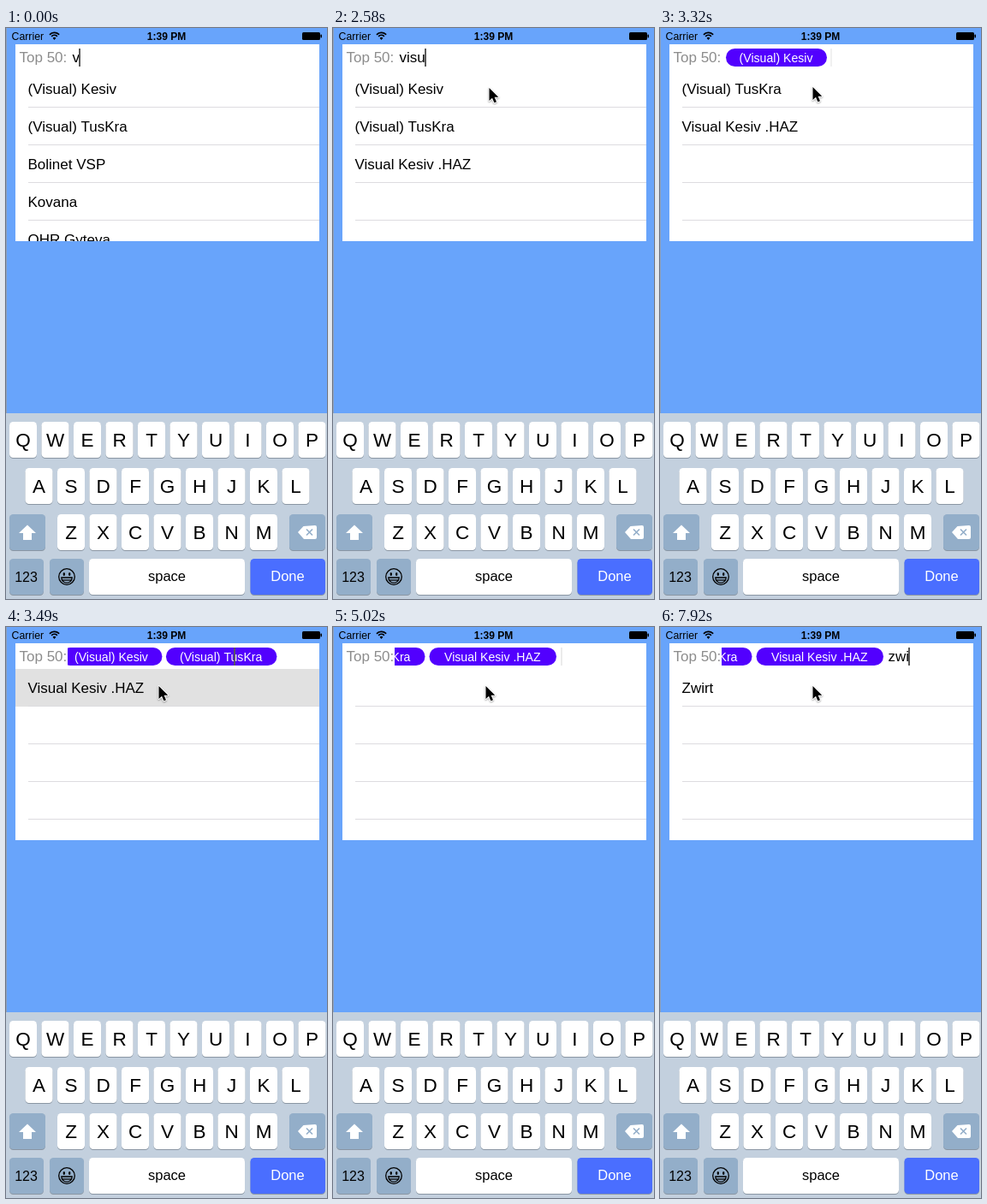
Write an HTML page with a canvas that moves like this. It is 375 by 667 pixels and loops after 8000 ms.

```html
<!DOCTYPE html>
<html lang="en">
<head>
<meta charset="utf-8">
<title>Token field</title>
<style>
html, body { margin: 0; width: 100%; height: 100%; overflow: hidden; background: #68a4fb; }
canvas { display: block; width: 375px; height: 667px; }
</style>
</head>
<body>
<canvas id="stage" width="375" height="667"></canvas>
<script>
const ctx = document.getElementById('stage').getContext('2d');
const LOOP = 8000;
const FONT = '"Liberation Sans", Arial, sans-serif';
const ROW_TOP = 49, ROW_H = 44;
const BASE = '(Visual) Kesiv', TUSK = '(Visual) TusKra', HAZ = 'Visual Kesiv .HAZ';

// Each entry holds from its time until the next one.
const lists = [
  [0, [BASE, TUSK, 'Bolinet VSP', 'Kovana', 'OHR Gyteva']],
  [110, [BASE, TUSK, 'DolVIRN', 'Moviran', HAZ]],
  [350, [BASE, TUSK, HAZ]],
  [2760, [TUSK, HAZ]],
  [3440, [HAZ]],
  [4310, []],
  [5490, ['Arxuno', 'Brixet', 'Doxalin', 'Korux', 'Mexado']],
  [7380, ['Azuno', 'Brezil', 'Gozanta', 'Kizmer', 'Lozeda']],
  [7680, ['Zwirt']]
];
const typed = [
  [0, 'v'], [60, 'vi'], [350, 'vis'], [530, 'visu'], [2760, ''],
  [5430, 'x'], [7210, ''], [7380, 'z'], [7680, 'zw'], [7920, 'zwi']
];
const inputStart = [[0, 77], [2760, 199], [3440, 266]];
const caretStates = [
  [0, 1], [1100, 0], [1540, 1], [2090, 0], [2480, 1], [2700, 1], [3180, 0],
  [3400, 1], [3890, 0], [4310, 1], [4885, 0], [5350, 1], [5885, 0],
  [6340, 1], [6890, 0], [7200, 1]
];
// Token left edge and width are relative to the scrolled content.
const tokens = [
  { at: 2760, x: 0, w: 118, text: BASE },
  { at: 3440, x: 122.5, w: 129.5, text: TUSK },
  { at: 4310, x: 257, w: 148.5, text: HAZ }
];
const taps = [[2700, 2760, 2980], [3380, 3440, 3670], [4130, 4310, 4540]];

const clamp = v => Math.max(0, Math.min(1, v));
const easeOut = v => 1 - (1 - clamp(v)) ** 3;
const smooth = v => { v = clamp(v); return v * v * (3 - 2 * v); };
const mix = (a, b, k) => a + (b - a) * k;
const indexAt = (track, t) => track.findLastIndex(e => e[0] <= t);
const valueAt = (track, t) => track[indexAt(track, t)][1];

function rect(x, y, w, h, color) {
  ctx.fillStyle = color;
  ctx.fillRect(x, y, w, h);
}

function rounded(x, y, w, h, r, color) {
  ctx.fillStyle = color;
  ctx.beginPath();
  ctx.roundRect(x, y, w, h, r);
  ctx.fill();
}

function polygon(points, color) {
  ctx.fillStyle = color;
  ctx.beginPath();
  points.forEach(([x, y]) => ctx.lineTo(x, y));
  ctx.closePath();
  ctx.fill();
}

function text(str, x, y, size, color = '#000', align = 'left', weight = '') {
  ctx.font = `${weight} ${size}px ${FONT}`;
  ctx.textAlign = align;
  ctx.fillStyle = color;
  ctx.fillText(str, x, y);
}

function clipped(x, y, w, h, draw) {
  ctx.save();
  ctx.beginPath();
  ctx.rect(x, y, w, h);
  ctx.clip();
  draw();
  ctx.restore();
}

function statusBar() {
  text('Carrier', 6.5, 13.5, 12.3);
  text('1:39 PM', 187.5, 13.5, 12, '#000', 'center', 'bold');
  ctx.strokeStyle = '#000';
  ctx.lineWidth = 1.7;
  for (const r of [4.6, 7.6]) {
    ctx.beginPath();
    ctx.arc(56.5, 13, r, -Math.PI * 0.76, -Math.PI * 0.24);
    ctx.stroke();
  }
  ctx.fillStyle = '#000';
  ctx.beginPath();
  ctx.moveTo(56.5, 14);
  ctx.arc(56.5, 13.5, 2.6, -Math.PI * 0.76, -Math.PI * 0.24);
  ctx.fill();
  rounded(346, 5, 21, 9, 1.5, '#000');
  rounded(367.5, 7.5, 1.5, 4, 0.7, '#000');
}

function key(x, y, w, color = '#fff') {
  rounded(x, y + 1, w, 42, 4.5, '#8a96a3');
  rounded(x, y, w, 42, 4.5, color);
}

function keyboard() {
  const gray = '#93aec9';
  rect(0, 450, 375, 217, '#c3d0de');
  [['QWERTYUIOP', 4, 460], ['ASDFGHJKL', 22.5, 514], ['ZXCVBNM', 60, 568]].forEach(([row, left, y]) => {
    [...row].forEach((letter, i) => {
      const x = left + i * 37.5;
      key(x, y, 32);
      text(letter, x + 16, y + 29, 22.5, '#000', 'center');
    });
  });

  key(4, 568, 42, gray);
  polygon([[25, 580.5], [35, 590], [30, 590], [30, 598], [20, 598], [20, 590], [15, 590]], '#fff');

  key(331, 568, 42, gray);
  ctx.fillStyle = '#fff';
  ctx.beginPath();
  ctx.moveTo(341, 589);
  ctx.lineTo(347.5, 582);
  ctx.lineTo(361, 581);
  ctx.arcTo(363, 581, 363, 583, 2);
  ctx.arcTo(363, 597, 361, 597, 2);
  ctx.lineTo(348, 597);
  ctx.closePath();
  ctx.fill();
  ctx.strokeStyle = gray;
  ctx.lineWidth = 1.6;
  ctx.beginPath();
  ctx.moveTo(351, 585.5); ctx.lineTo(358, 592.5);
  ctx.moveTo(358, 585.5); ctx.lineTo(351, 592.5);
  ctx.stroke();

  key(4, 620, 40, gray);
  text('123', 23.5, 647, 16, '#000', 'center');
  key(51, 620, 40, gray);
  smiley(71, 641);
  key(97, 620, 182);
  text('space', 188, 646, 16.5, '#000', 'center');
  key(285.5, 620, 87.5, '#4a6eff');
  text('Done', 329, 646, 16.5, '#fff', 'center');
}

function smiley(x, y) {
  ctx.strokeStyle = ctx.fillStyle = '#000';
  ctx.lineWidth = 1.3;
  ctx.beginPath();
  ctx.arc(x, y, 9.3, 0, Math.PI * 2);
  ctx.stroke();
  for (const dx of [-3.2, 3.2]) {
    ctx.beginPath();
    ctx.ellipse(x + dx, y - 3, 1.2, 1.9, 0, 0, Math.PI * 2);
    ctx.fill();
  }
  ctx.beginPath();
  ctx.arc(x, y + 1, 6.2, 0, Math.PI);
  ctx.closePath();
  ctx.stroke();
  ctx.beginPath();
  ctx.moveTo(x - 5, y + 4);
  ctx.lineTo(x + 5, y + 4);
  ctx.stroke();
}

function results(t) {
  clipped(11, 19, 355, 230, () => {
    for (const [down, commit, end] of taps) {
      if (t < down || t >= end) continue;
      ctx.globalAlpha = 1 - clamp((t - commit) / (end - commit));
      rect(11, ROW_TOP, 355, ROW_H, '#d9d9d9');
      ctx.globalAlpha = 1;
    }
    for (let i = 1; i < 5; i++) rect(26, ROW_TOP - 1 + i * ROW_H, 340, 1, '#dddce0');
    valueAt(lists, t).forEach((name, i) => text(name, 25.5, 77 + i * ROW_H, 17));
  });
}

function caretAlpha(t) {
  const i = indexAt(caretStates, t);
  const [start, goal] = caretStates[i];
  const from = i ? caretStates[i - 1][1] : 1;
  return mix(from, goal, clamp((t - start) / (goal ? 100 : 155)));
}

function inputField(t) {
  text('Top 50:', 15.5, 40, 17, '#8c8c8c');
  const scroll = 100 * smooth((t - 3440) / 230) + 121.5 * smooth((t - 4310) / 230);
  clipped(72, 20, 292, 29, () => {
    for (const token of tokens) {
      if (t < token.at) continue;
      const x = 77 + token.x - scroll;
      rounded(x, 24, token.w, 21, 10.5, '#5200fe');
      text(token.text, x + token.w / 2 - 0.5, 39.5, 14.1, '#fff', 'center');
    }
  });
  const start = valueAt(inputStart, t), str = valueAt(typed, t);
  text(str, start + 0.5, 40, 17);
  ctx.globalAlpha = caretAlpha(t);
  rect(Math.floor(start + ctx.measureText(str).width), 24, 2, 21, '#5a5a5a');
  ctx.globalAlpha = 1;
}

function pointer(t) {
  if (t < 1890) return;
  const k = easeOut((t - 1890) / 660), nudge = smooth((t - 2580) / 140);
  ctx.save();
  ctx.translate(mix(303, 182, k) - 4 * nudge, mix(321, 70, k) - nudge);
  ctx.beginPath();
  [[0.5, 0], [0.5, 15], [4, 11.8], [6.4, 17.3], [9, 16.2], [6.6, 10.8], [11.3, 10.8]]
    .forEach(([x, y]) => ctx.lineTo(x, y));
  ctx.closePath();
  ctx.shadowColor = 'rgba(0,0,0,.35)';
  ctx.shadowBlur = 2;
  ctx.shadowOffsetY = 1;
  ctx.strokeStyle = '#fff';
  ctx.lineWidth = 2;
  ctx.lineJoin = 'round';
  ctx.stroke();
  ctx.shadowColor = 'transparent';
  ctx.fillStyle = '#000';
  ctx.fill();
  ctx.restore();
}

function draw(t) {
  rect(0, 0, 375, 667, '#68a4fb');
  rect(0, 0, 1, 450, '#8a9fbd');
  statusBar();
  rect(11, 19, 355, 230, '#fff');
  results(t);
  inputField(t);
  keyboard();
  pointer(t);
}

const began = performance.now();
function tick() {
  draw((performance.now() - began) % LOOP);
  requestAnimationFrame(tick);
}
tick();
</script>
</body>
</html>
```
